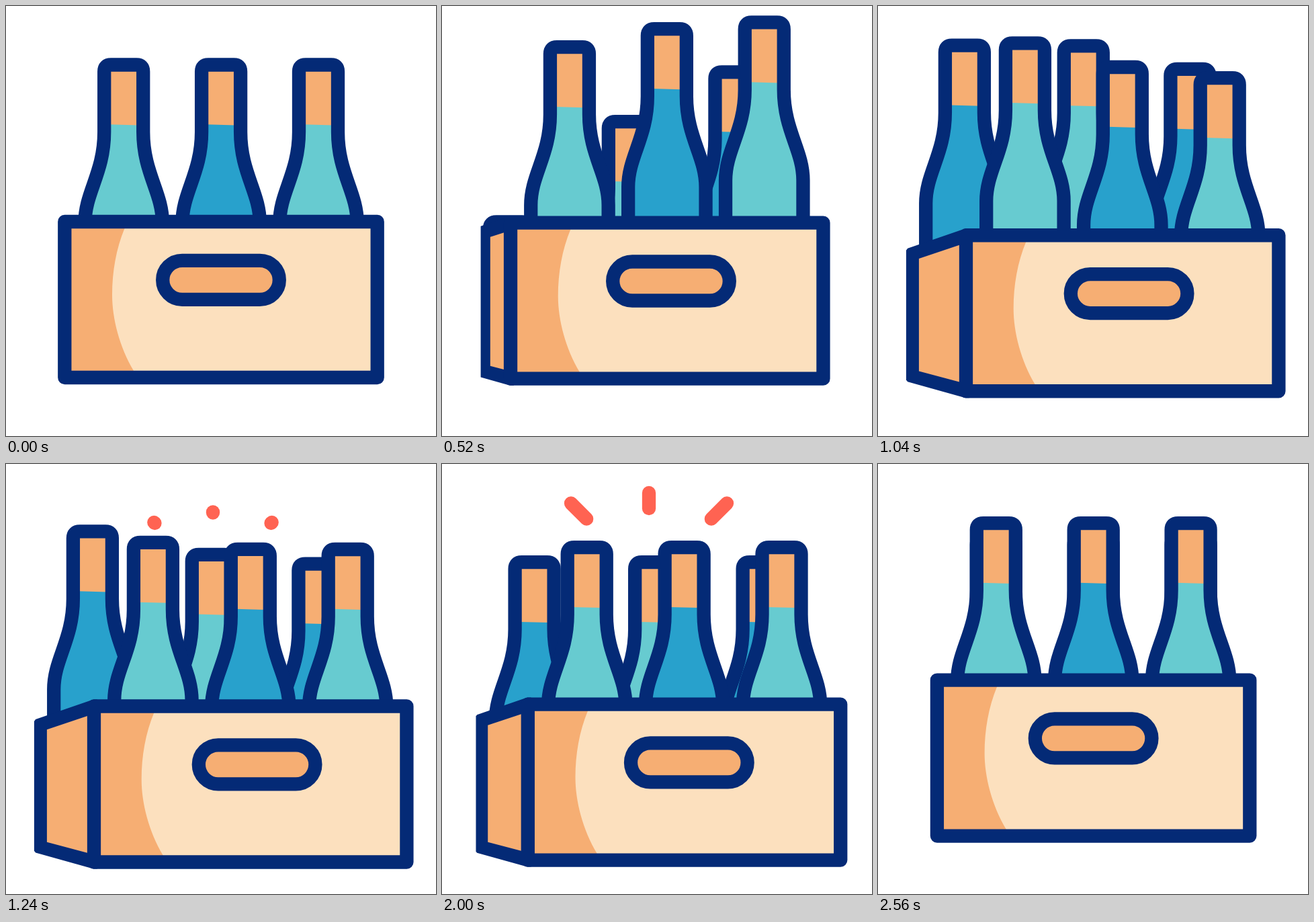
Recreate the animation shown at these times as an HTML page with a canvas. Size 640 by 640 pixels, loop 2.6 s.

```html
<!DOCTYPE html>
<html lang="en">
<head>
<meta charset="utf-8">
<title>Bottle crate</title>
<style>
  html, body { margin: 0; width: 100%; height: 100%; overflow: hidden; background: #fff; }
  canvas { display: block; width: 100vmin; height: 100vmin; }
</style>
</head>
<body>
<canvas id="stage" width="640" height="640"></canvas>
<script>
const ctx = document.getElementById('stage').getContext('2d');
const LOOP = 2600, LEAVE = 1850, LINE = 20.3;
const NAVY = '#042a76', ORANGE = '#f6ae73', CREAM = '#fce0be',
      TEAL = '#67cbd0', BLUE = '#28a1cc', RED = '#ff6352';

// Easings over a time span: soft, strong in and out, quick with a long landing.
const span = (t, from, to) => Math.min(1, Math.max(0, (t - from) / (to - from)));
function ease(t, from, to) {
  const u = span(t, from, to);
  return u * u * (3 - 2 * u);
}
function glide(t, from, to) {
  const u = span(t, from, to);
  return u < .5 ? 4 * u ** 3 : 1 - 4 * (1 - u) ** 3;
}
function settle(t, from, to) {
  const u = span(t, from, to);
  return 1 - (1 - u) ** 3 * (1 + 3 * u);
}

// Vertical bottle moves: front ones hop, back ones shoot up from inside the crate.
const hop = t => -65 * settle(t, 0, 580) * (1 - settle(t, 620, 1105));
const emerge = t => 85 * (2 ** ((493 - t) / 118) - 1) * (1 - settle(t, 860, 1290));

const frontX = i => 175.2 + 144.9 * i;
const back = [
  { shift: -90, home: 2513 },
  { shift: -58, home: 2331 },
  { shift: -44.3, home: 2230 }
];

const glass = new Path2D(`M-57.7 420V245C-57.7 200 -29 171 -29 110V20Q-29 10 -19 10
  H19Q29 10 29 20V110C29 171 57.7 200 57.7 245V420Z`);
const shade = new Path2D('M90 325H178.5L176.5 331C164 361 158 395 158 430S169 508 190 543L194 550H90Z');

function bottle(x, y, color) {
  ctx.save();
  ctx.translate(x, y);
  ctx.fillStyle = color;
  ctx.fill(glass);
  polygon(ORANGE, [-22, 15], [22, 15], [22, 100], [-22, 98.8]);
  ctx.stroke(glass);
  ctx.restore();
}

function polygon(color, ...pts) {
  ctx.fillStyle = color;
  ctx.beginPath();
  pts.forEach(([x, y]) => ctx.lineTo(x, y));
  ctx.fill();
}

function bottles(t, dx, dy) {
  const top = 77.5 + dy;
  ctx.save();
  ctx.beginPath();
  ctx.rect(0, 0, 640, 346 + dy);
  ctx.clip();
  back.forEach(({ shift, home }, i) => {
    const x = frontX(i) + dx + shift * (1 - ease(t, LEAVE, home));
    bottle(x, top + 22 + emerge(t - 240 + 120 * i), i % 2 ? TEAL : BLUE);
  });
  for (let i = 0; i < 3; i++) {
    bottle(frontX(i) + dx, top + hop(t - 320 + 160 * i), i % 2 ? BLUE : TEAL);
  }
  ctx.restore();
}

function side(dx, dy, open) {
  const w = 79 * open;
  if (w < .5) return;
  const x = 77.2 + dx, top = 311 + dy, bottom = 563 + dy;
  const left = x - w, edge = x + 9, run = w + 9, cut = 4 * Math.max(0, open - .45);
  const y0 = top + .345 * run, y1 = bottom - .28 * run;
  polygon(NAVY, [edge, top], [left + cut, y0 - cut * .35], [left, y0 + cut],
    [left, y1 - cut], [left + cut, y1 + cut * .28], [edge, bottom], [edge + 6, bottom], [edge + 6, top]);
  const wall = 10.5 + 8.5 * open, gap = w - wall;
  if (gap > 0) {
    polygon(ORANGE, [x + 1, top + 24.3], [left + wall, top + 24.3 + .34 * gap],
      [left + wall, bottom - 23.5 - .27 * gap], [x + 1, bottom - 23.5]);
  }
}

function crate(dx, dy, nudge) {
  ctx.save();
  ctx.translate(dx, dy);
  ctx.fillStyle = CREAM;
  ctx.fillRect(87.3, 321, 465.4, 232);
  ctx.fillStyle = ORANGE;
  ctx.fill(shade);
  ctx.strokeRect(87.3, 321, 465.4, 232);
  ctx.beginPath();
  ctx.roundRect(233.2 + nudge, 378.8, 173.6, 58, 29);
  ctx.fill();
  ctx.stroke();
  ctx.restore();
}

function sparks(t) {
  const head = ease(t, 1180, 1685), tail = ease(t, LEAVE, 2355);
  if (head <= tail) return;
  ctx.strokeStyle = RED;
  for (const dir of [-1, 0, 1]) {
    const x = k => 308 + dir * (86.5 + 29.5 * k);
    const y = k => (dir ? 88 : 72.5) - 29.5 * k;
    ctx.beginPath();
    ctx.moveTo(x(tail), y(tail));
    ctx.lineTo(x(head), y(head));
    ctx.stroke();
  }
}

function draw(t) {
  const rest = 1 - ease(t, 1880, 2612);
  const slide = glide(t, 100, 1060);
  const dx = 43.7 * slide * rest;
  const dy = (5 * slide + 34.5 * ease(t, 905, 1200)) * rest;
  const open = glide(t, 20, 1070) * (1 - ease(t, LEAVE, 2470));
  const nudge = 9.9 * glide(t, 0, 950) * (1 - ease(t, LEAVE, 2300));

  ctx.fillStyle = '#fff';
  ctx.fillRect(0, 0, 640, 640);
  ctx.lineWidth = LINE;
  ctx.lineCap = ctx.lineJoin = 'round';
  ctx.strokeStyle = NAVY;

  bottles(t, dx, dy);
  side(dx, dy, open);
  crate(dx, dy, nudge);
  sparks(t);
}

const start = performance.now();
function tick() {
  draw((performance.now() - start) % LOOP);
  requestAnimationFrame(tick);
}
tick();
</script>
</body>
</html>
```
